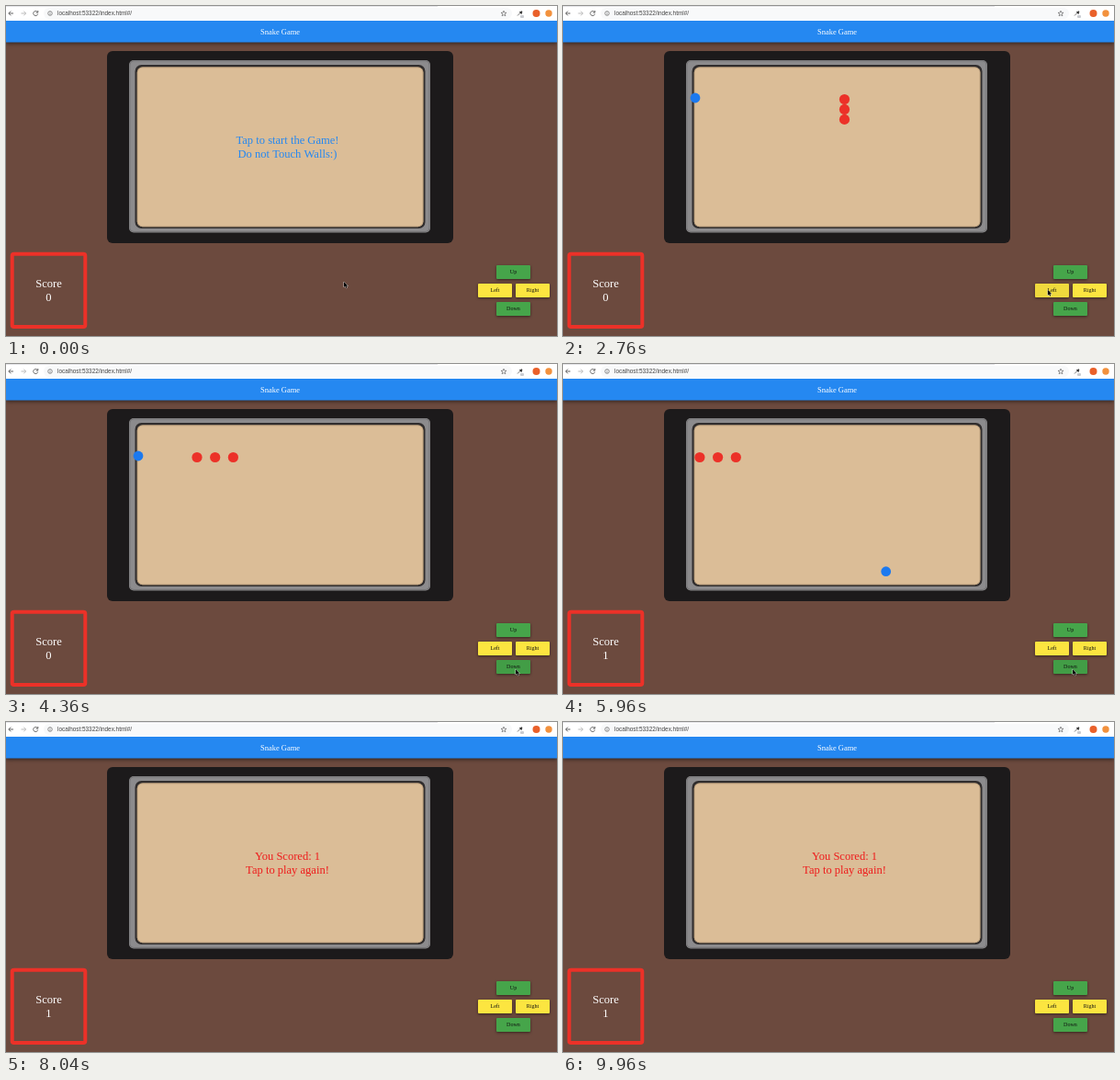
An HTML page with a canvas for the animation above (10 s loop, 600 by 359 pixels).

```html
<!DOCTYPE html>
<html lang="en">
<head>
<meta charset="utf-8">
<title>Snake Game</title>
<style>
html, body { margin: 0; height: 100%; overflow: hidden; }
canvas { display: block; width: 600px; height: 359px; }
</style>
</head>
<body>
<canvas id="stage" width="600" height="359"></canvas>
<script>
const ctx = document.getElementById('stage').getContext('2d');
const SERIF = '"Liberation Serif", Times, serif';
const SANS = '"Liberation Sans", Arial, sans-serif';
const LOOP = 10000, START = 660, EATEN = 5660, OVER = 6160;
const BLUE = '#2588f1', RED = '#ec3128';

// Timer ticks every 500 ms; the Left button adds two immediate moves.
const upMoves = [1160, 1660, 2160, 2660];
const leftMoves = [2820, 2980, 3160, 3660, 4160, 4660, 5160, 5660];

// Pointer stops: time, x, y
const pointerPath = [
  [0, 368, 300], [160, 368, 300], [460, 335, 220], [700, 335, 220],
  [1360, 501, 291], [1750, 527, 308], [3050, 528, 309], [3600, 555, 332],
  [6500, 555, 332], [7500, 480, -10], [LOOP, 480, -10]
];

const buttons = [
  ['Up', 534, 282, '#46a54a'], ['Left', 514, 302, '#fce540'],
  ['Right', 555, 302, '#fce540'], ['Down', 534, 322, '#46a54a']
];

function box(x, y, w, h, r, color) {
  ctx.fillStyle = color;
  ctx.beginPath();
  ctx.roundRect(x, y, w, h, r);
  ctx.fill();
}

function frame(x, y, w, h, r, color, width) {
  ctx.strokeStyle = color;
  ctx.lineWidth = width;
  ctx.beginPath();
  ctx.roundRect(x, y, w, h, r);
  ctx.stroke();
}

function dot(x, y, r, color) {
  ctx.fillStyle = color;
  ctx.beginPath();
  ctx.arc(x, y, r, 0, 7);
  ctx.fill();
}

function text(str, x, y, size, color, align = 'center', family = SERIF) {
  ctx.font = `${size}px ${family}`;
  ctx.textAlign = align;
  ctx.fillStyle = color;
  ctx.fillText(str, x, y);
}

function line(path, color, width = 0.9) {
  ctx.strokeStyle = color;
  ctx.lineWidth = width;
  ctx.stroke(new Path2D(path));
}

function withShadow(blur, dy, draw) {
  ctx.save();
  ctx.shadowColor = 'rgba(0,0,0,.5)';
  ctx.shadowBlur = blur;
  ctx.shadowOffsetY = dy;
  draw();
  ctx.restore();
}

function pointerAt(t) {
  const i = pointerPath.findIndex(p => p[0] > t);
  const [t0, x0, y0] = pointerPath[i - 1], [t1, x1, y1] = pointerPath[i];
  const k = (t - t0) / (t1 - t0), e = k * k * (3 - 2 * k);
  return [x0 + (x1 - x0) * e, y0 + (y1 - y0) * e];
}

function drawToolbar() {
  box(0, 0, 600, 16, 0, '#fff');
  box(0, 0, 470, 0.7, 0, '#dcdde0');
  box(41, 2, 510, 12, 6, '#f8f9fa');
  line('M8 8H3M5.2 5.6L2.8 8L5.2 10.4', '#555');
  line('M16.5 8H21.5M19.3 5.6L21.7 8L19.3 10.4', '#b5b5b5');
  line('M34.3 6.6A2.5 2.5 0 1 0 34.7 8.6M34.8 5V7.1H32.6', '#555');
  ctx.strokeStyle = '#666';
  ctx.lineWidth = 0.7;
  ctx.beginPath();
  ctx.arc(48, 8, 2.3, 0, 7);
  ctx.stroke();
  line('M48 7.7V9.4M48 6.4V7', '#666', 0.7);
  text('localhost:53322/index.html#/', 56, 10.3, 6.4, '#444', 'left', SANS);
  line('M542 5.2L542.8 7.2L545 7.3L543.3 8.6L543.9 10.8L542 9.6L540.1 10.8L540.7 8.6L539 7.3L541.2 7.2Z', '#555', 0.6);
  line('M557 10.5L560.4 7.1', '#777', 1);
  line('M559.5 6.2L561.7 8.4M560.5 7.3L562 5.8', '#333', 1.5);
  box(560, 10, 4, 3, 1, '#c9cbd0');
  dot(577.5, 8, 4, '#e9602a');
  dot(591, 8, 3.7, '#f2913d');
}

function drawBoard() {
  box(110, 49, 377, 209, 6, '#1c1a1b');
  box(134, 59, 328, 187.5, 5, '#8c8b8d');
  frame(135, 60, 326, 185.5, 4, '#777678', 1);
  box(140.5, 64, 316, 178, 7, '#302d2d');
  box(142.8, 66.4, 311.6, 173.8, 6, '#dbbd97');
  frame(143.2, 66.8, 310.8, 173, 5.5, '#b59a78', 0.8);
}

function drawGame(t) {
  if (t < START) {
    text('Tap to start the Game!', 306.5, 150, 12.55, BLUE);
    text('Do not Touch Walls:)', 306.5, 165, 12.55, BLUE);
  } else if (t < OVER) {
    const done = moves => moves.filter(m => m <= t).length;
    const up = done(upMoves), left = done(leftMoves);
    for (let i = 0; i < 3; i++) {
      const across = Math.max(0, left - i);
      const behind = Math.max(0, i - left);
      dot(306.5 - across * 19.7, 145.3 - up * 10.95 + behind * 10.95, 5.6, RED);
    }
    if (t < EATEN) dot(144, 100, 5.4, '#1c79ef');
    else dot(351.7, 225.7, 5.4, '#1c79ef');
  } else {
    text('You Scored: 1', 306.5, 150, 12.55, '#ee1c1c');
    text('Tap to play again!', 306.5, 165, 12.55, '#ee1c1c');
  }
}

function drawButtons(px, py) {
  for (const [label, x, y, color] of buttons) {
    withShadow(3, 1, () => box(x, y, 37, 15, 1, color));
    if (px > x && px < x + 37 && py > y && py < y + 15)
      box(x, y, 37, 15, 1, 'rgba(0,0,0,.05)');
    text(label, x + 18.5, y + 9.3, 6.05, '#111');
  }
}

function drawPointer(x, y) {
  const arrow = new Path2D('M0 0V6L1.4 4.8L2.4 6.9L3.3 6.5L2.4 4.4H4.3Z');
  ctx.save();
  ctx.translate(x, y);
  ctx.strokeStyle = 'rgba(255,255,255,.75)';
  ctx.lineWidth = 0.9;
  ctx.stroke(arrow);
  ctx.fillStyle = '#000';
  ctx.fill(arrow);
  ctx.restore();
}

function draw(now) {
  const t = now % LOOP;
  const [px, py] = pointerAt(t);
  box(0, 0, 600, 359, 0, '#6c4a3e');
  withShadow(4, 1.5, () => box(0, 16, 600, 23.5, 0, BLUE));
  drawToolbar();
  text('Snake Game', 298.5, 30.8, 8.45, '#fff');
  drawBoard();
  drawGame(t);
  frame(6.7, 269.7, 79.6, 79.2, 2, RED, 4);
  text('Score', 46.5, 306, 12.55, '#fff');
  text(t < EATEN ? '0' : '1', 46.5, 321, 12.55, '#fff');
  drawButtons(px, py);
  drawPointer(px, py);
  requestAnimationFrame(draw);
}
requestAnimationFrame(draw);
</script>
</body>
</html>
```
